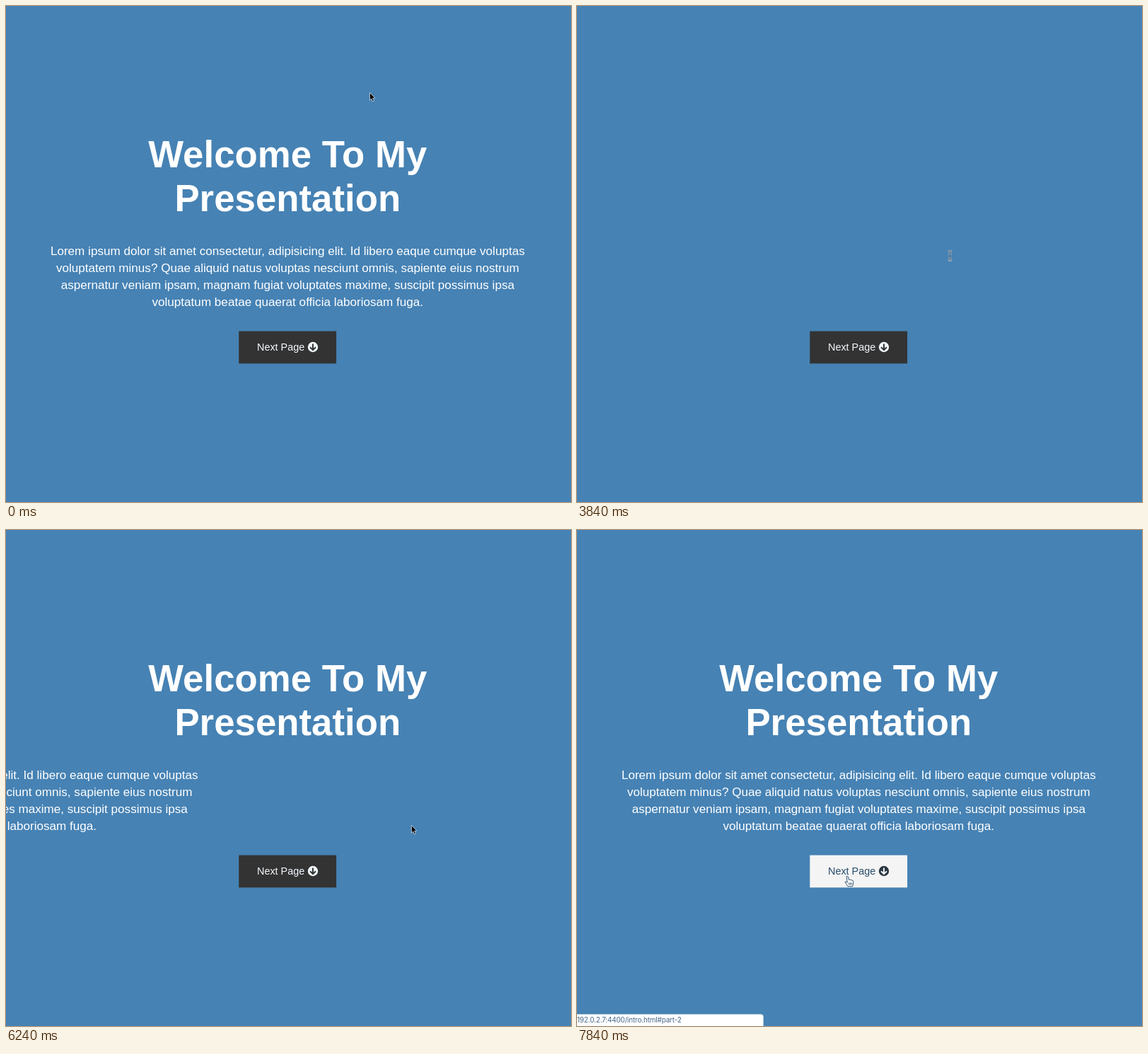
Recreate the animation shown at these times as an HTML page. Size 799 by 701 pixels, loop 8 s.

```html
<!DOCTYPE html>
<html lang="en">
<head>
<meta charset="utf-8">
<title>Presentation</title>
<style>
  html, body { margin: 0; height: 100%; overflow: hidden; background: #4682b4; }
  svg { display: block; width: 100%; height: 100%; font-family: "Liberation Sans", Arial, sans-serif; }
  .centered { text-anchor: middle; fill: #fff; }
  #heading { font-size: 52.8px; font-weight: bold; }
  #intro { font-size: 17.1px; }
  #button { --face: #333; --label: #f4f9ff; --icon: #f0f8ff; }
  #button.hover { --face: #f4f4f4; --label: #274c6b; --icon: #283742; }
  #button rect { fill: var(--face); }
  #button text { fill: var(--label); font-size: 14.4px; }
  #button circle { fill: var(--icon); }
  #button path { fill: none; stroke: var(--face); stroke-width: 2; }
  #status text { font: 10px Inter, sans-serif; letter-spacing: -.2px; fill: #47688a; }
</style>
</head>
<body>
<svg viewBox="0 0 799 701">
  <g id="heading" class="centered">
    <text x="398.3" y="228">Welcome To My</text>
    <text x="398.3" y="290">Presentation</text>
  </g>
  <g id="intro" class="centered">
    <text x="398.3" y="352">Lorem ipsum dolor sit amet consectetur, adipisicing elit. Id libero eaque cumque voluptas</text>
    <text x="398.3" y="376">voluptatem minus? Quae aliquid natus voluptas nesciunt omnis, sapiente eius nostrum</text>
    <text x="398.3" y="400">aspernatur veniam ipsam, magnam fugiat voluptates maxime, suscipit possimus ipsa</text>
    <text x="398.3" y="424">voluptatum beatae quaerat officia laboriosam fuga.</text>
  </g>
  <g id="button">
    <rect x="329.3" y="459.6" width="137.8" height="45.7"/>
    <text x="355" y="487">Next Page</text>
    <circle cx="434" cy="482" r="7.2"/>
    <path d="M434 477.4V486M430 482.2L434 486.2L438 482.2"/>
  </g>
  <g id="status">
    <path d="M-1 702V684.5H260Q263.5 684.5 263.5 688V702Z" fill="#fff" stroke="#c3d3e2" stroke-width=".6"/>
    <text x="0" y="696.3">192.0.2.7:4400/intro.html#part-2</text>
  </g>
  <g id="cursor">
    <path id="arrow" d="M.4 .4V11.2L2.8 9L4.5 12.9L6.4 12.1L4.7 8.3L7.8 8Z" fill="#000" stroke="#dbe6f0" stroke-width=".8"/>
    <g id="beam" fill="none">
      <path d="M-3 -6Q0 -6 0 -4V5Q0 7 -3 7M3 -6Q0 -6 0 -4V5Q0 7 3 7" stroke="#c4d4e2" stroke-width="2.4"/>
      <path d="M-3 -6Q0 -6 0 -4V5Q0 7 -3 7M3 -6Q0 -6 0 -4V5Q0 7 3 7M-1.2 1H1.2" stroke="#2b3d4d" stroke-width=".9"/>
    </g>
    <path id="hand" d="M-1.4 .3Q-.2 -1 .9 .4L2 5Q3.4 3.8 4.3 5.1Q5.7 4.3 6.4 5.7Q8 5.3 8.2 7V10.2L7 14.2H.7L-1.5 11.2L-3.4 8.2Q-3.2 6.6 -1.4 7.8L-.2 8.8ZM2.2 9V12M4 9V12M5.8 9V12" fill="#fff" stroke="#1d425f" stroke-width=".9" stroke-linejoin="round"/>
  </g>
</svg>
<script>
const DURATION = 8000, TICK = 160;
const el = id => document.getElementById(id);
const shapes = ["arrow", "beam", "hand"];

// start time, x, y, cursor shape
const pointer = [
  [0, 514, 122, "arrow"], [160, 474, 518.5, "arrow"], [2080, 486, 457, "arrow"],
  [2240, 527.7, 352.4, "arrow"], [2720, 527.5, 352.4, "beam"],
  [6240, 573, 417, "arrow"], [6400, 589, 500, "arrow"], [6560, 579, 506, "arrow"],
  [6720, 552.5, 523.5, "arrow"], [6880, 551.5, 524.5, "arrow"], [7040, 466.5, 526.5, "arrow"],
  [7200, 402.5, 518.5, "arrow"], [7360, 388.5, 501.5, "arrow"], [7520, 382.5, 489.5, "hand"]
];

const move = (id, x, y) => el(id).setAttribute("transform", `translate(${x} ${y})`);

// Linear slide that comes to rest at `end`; the page reloads at 3840 ms.
const slide = (t, end, speed) => t < 3840 ? 0 : Math.min(0, (t - end) * speed);

function draw() {
  const now = performance.now() % DURATION;
  const t = Math.floor(now / TICK) * TICK;

  move("heading", 0, slide(t, 5685, 0.8));
  move("intro", slide(t, 6650, 1.127), 0);

  const [, x, y, shape] = pointer.findLast(p => p[0] <= t);
  move("cursor", x, y);
  for (const s of shapes) el(s).style.display = s === shape ? "" : "none";

  el("button").classList.toggle("hover", t >= 7520);
  el("status").style.opacity = t < 7680 ? 0 : t < 7840 ? 0.5 : 1;
  requestAnimationFrame(draw);
}
draw();
</script>
</body>
</html>
```
